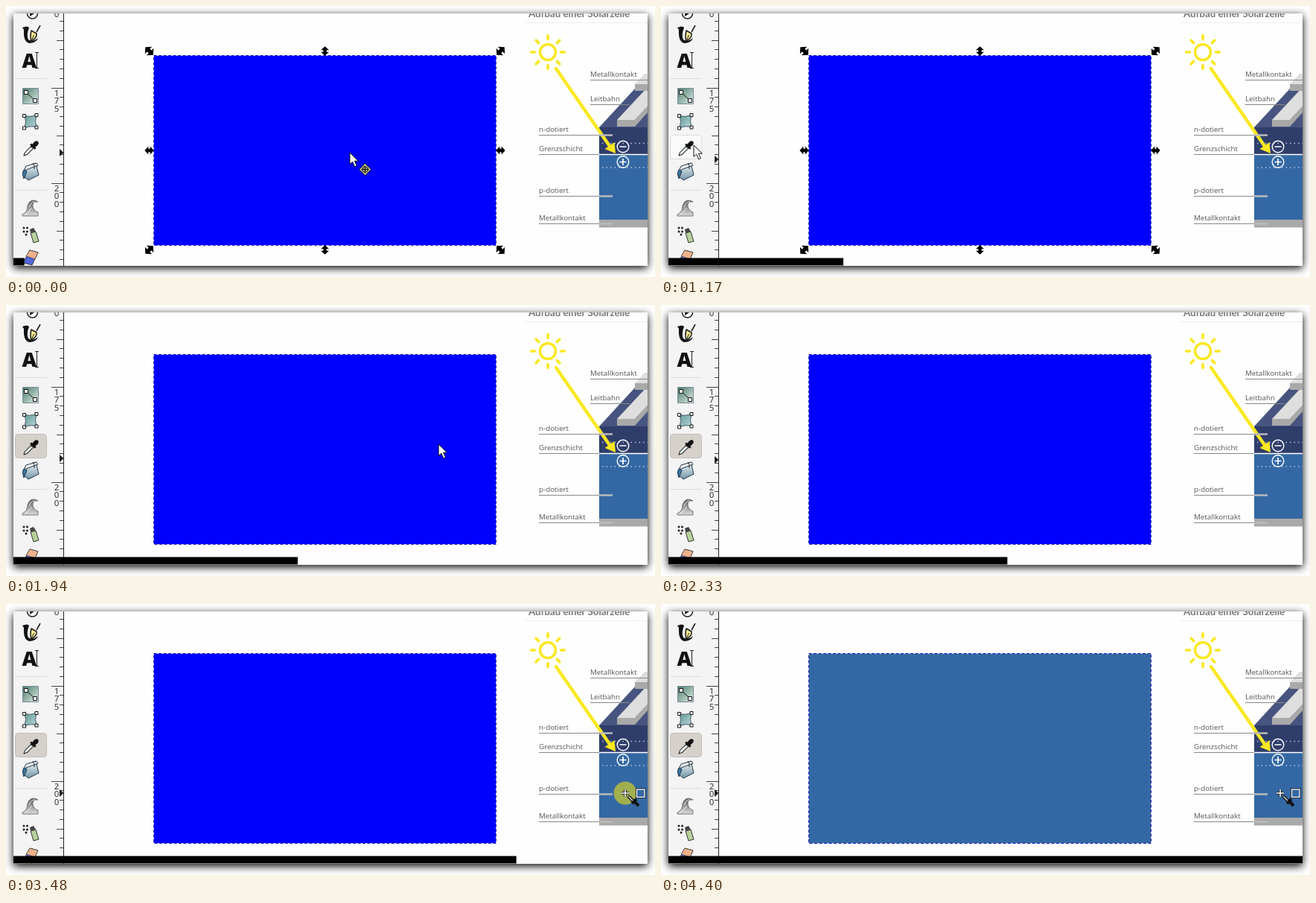
These frames come from a looping animation (872x364 px, 4490 ms). An HTML page:

```html
<!DOCTYPE html>
<html lang="de">
<head>
<meta charset="utf-8">
<style>
  html, body { margin: 0; width: 100%; height: 100%; overflow: hidden; background: #fff; }
  svg { display: block; }
  .shadow { filter: drop-shadow(0 3px 6px #000); }
  .label { font: 9.8px "Open Sans", "Noto Sans", sans-serif; fill: #555; }
  .title { font: bold 13.3px Lato, sans-serif; fill: #777; }
  .ruler { font: 11.5px "Noto Sans", sans-serif; fill: #333; text-anchor: middle; }
</style>
</head>
<body>
<svg width="872" height="364" viewBox="0 0 872 364">
  <defs>
    <clipPath id="view"><rect x="10" y="10" width="852" height="339"/></clipPath>
    <linearGradient id="green" x2="1" y2="1"><stop stop-color="#477b69"/><stop offset="1" stop-color="#e4efe9"/></linearGradient>
    <linearGradient id="mesh" x2="1" y2="1"><stop stop-color="#5f9a8e"/><stop offset="1" stop-color="#b9d6e0"/></linearGradient>
    <linearGradient id="water" x2="0" y2="1"><stop stop-color="#f4f7f8"/><stop offset="1" stop-color="#6f95a8"/></linearGradient>
    <linearGradient id="wave" x2="0" y2="1"><stop stop-color="#555"/><stop offset="1" stop-color="#ddd"/></linearGradient>
    <path id="handle" d="M-6.2 0l5-5.5v3.3h2.4v-3.3l5 5.5-5 5.5v-3.3h-2.4v3.3z"/>
  </defs>
  <rect class="shadow" x="10" y="10" width="852" height="339" fill="#fff"/>
  <g clip-path="url(#view)">
    <rect x="10" y="10" width="852" height="339" fill="#fefefe"/>

    <g id="diagram">
      <path d="M697 22.500H862" stroke="#eee"/>
      <text class="title" x="702" y="15">Aufbau einer Solarzelle</text>
      <path d="M797 163L845 111H862V163z" fill="#47547f"/>
      <path d="M797 163H862V199H797z" fill="#2f3d6a"/>
      <path d="M797 200H862V287H797z" fill="#3468a4"/>
      <path d="M797 287H862V297.500H797z" fill="#a9a9a9"/>
      <path d="M797 199.500H862" stroke="#fff" stroke-width="1.500"/>
      <path d="M801 184.500H862M801 217H862" stroke="#b9c6dc" stroke-width="1.500" stroke-dasharray="1.500 4"/>
      <path d="M821 153L862 109V135L845 153z" fill="#dedede"/>
      <path d="M821 153H845L862 135V143L845 162H821z" fill="#a9a9a9"/>
      <path d="M845 105L858 91H862V105z" fill="#dedede"/>
      <path d="M845 105H862V114H845z" fill="#a9a9a9"/>
      <g stroke="#fae822" fill="none">
        <circle cx="728" cy="62" r="10.500" stroke-width="3.500"/>
        <g id="rays" stroke-width="3.600" stroke-linecap="round"/>
        <path d="M739 84L813 191" stroke-width="4.500" stroke-linecap="round"/>
        <path d="M819 198L804.500 192 817.500 183z" fill="#fae822" stroke="none"/>
      </g>
      <g fill="none" stroke="#fff" stroke-width="1.400">
        <circle cx="829" cy="189" r="7.800"/><circle cx="829" cy="209.500" r="7.800"/>
        <path d="M824.500 189h9M824.500 209.500h9M829 205v9" stroke-width="1.700"/>
      </g>
      <g id="labels"></g>
    </g>

    <rect id="sheet" x="198.500" y="66.500" width="460" height="255" stroke="#d4d4f4"/>
    <rect x="198.500" y="66.500" width="460" height="255" fill="none" stroke="#1d1db8" stroke-dasharray="4 2.500"/>
    <g id="handles"></g>

    <rect x="10" y="10" width="67" height="339" fill="#f4f4f4"/>
    <path d="M12 97.500H55M12 247.500H55" stroke="#dcdcdc"/>
    <path d="M77.500 10V349" stroke="#222"/>
    <g id="ruler"></g>
    <path id="marker" d="M72-5l5.500 5-5.500 5z" fill="#222"/>
    <rect id="button" x="12.500" y="173.500" width="42" height="32" rx="4"/>

    <g id="icons" stroke-linejoin="round">
      <circle cx="35.500" cy="10" r="7" fill="#fff" stroke="#222" stroke-width="1.500"/>
      <path d="M32 5v9l6-4z" fill="#111"/>

      <path d="M22 29q7-3 9 0q-4 10-1 16q6 4 13-2q-2 6-11 7q-9-1-8-18z" fill="#111"/>
      <path d="M46 26l-5 9M34 33l7 4q1 6-7 10q-2-6 0-14z" fill="#f3e58d" stroke="#222" stroke-width="1.600"/>
      <path d="M34.500 46l3-7" stroke="#222"/>

      <text x="21.500" y="83" font-size="27" font-weight="800" font-family="Open Sans, sans-serif" fill="#111">A</text>
      <path d="M39 62.500h5M39 83.500h5M41.500 62.500v21" stroke="#222"/>

      <rect x="22.500" y="110.500" width="21" height="21" fill="url(#green)" stroke="#789"/>
      <path d="M27 116L39 127" stroke="#111"/>
      <path d="M24.500 113.500h5v5h-5zM36.500 124.500h5v5h-5z" fill="#fff" stroke="#111"/>

      <path d="M25 147Q32 150 41 146Q38 155 41 163Q33 160 25 164Q28 155 25 147z" fill="url(#mesh)" stroke="#456"/>
      <path d="M22.500 145.500h4v4h-4zM39 144.500h4v4h-4zM39 161h4v4h-4zM22.500 162h4v4h-4z" fill="#fff" stroke="#111"/>

      <g transform="translate(24 201) rotate(-45)">
        <path d="M0 0l4-2h12v4H4z" fill="#e4ecec" stroke="#222"/>
        <path d="M16-4.500h3v2q7-2 8 2.500q-1 4.500-8 2.500v2h-3z" fill="#111"/>
      </g>

      <path d="M26 217l14-6 4 16-14 7-6-5z" fill="url(#water)" stroke="#234"/>
      <path d="M24 221l19-7-2-3-14 4z" fill="#f5f8f9" stroke="#234"/>
      <path d="M24 220q-3 4 0 12l4-10z" fill="#3978a5" stroke="#234"/>
      <path d="M36 211q3 3 2 8" fill="none" stroke="#222"/>

      <path d="M22 280q7-3 7-12q4-11 14-5q-8-1-7 6q1 6 7 8v5H22z" fill="url(#wave)" stroke="#777"/>
      <path d="M31 270q3-8 8-7M25 280q8-4 9-9" fill="none" stroke="#eee"/>

      <path d="M24 298h9M24 303h9M27 307h2" stroke="#222" stroke-width="3" stroke-linecap="round" stroke-dasharray="0 4.500"/>
      <path d="M33 305l7-2 4 13-7 2z" fill="#b7d19b" stroke="#333"/>
      <path d="M32 300l5-2 3 5-7 2z" fill="#444"/>

      <path d="M32 328l11 3-8 17-12-3z" fill="#5468dc" stroke="#333"/>
      <path d="M32 328l11 3-4 9-12-4z" fill="#eeb28b" stroke="#555"/>
    </g>

    <circle id="click" r="15.500" fill="#bdc03a" opacity=".8"/>
    <g id="arrow">
      <path d="M0 0V15.500l3.600-3.300 3 6.600 2.700-1.200-3-6.400h5z" fill="#fff" stroke="#111"/>
      <g id="mover" transform="translate(20.500 22.500)" stroke="#111">
        <path d="M0-8L8 0 0 8-8 0z" fill="#c9c99d"/>
        <path d="M-5 0H5M0-5V5" stroke-width="1.300"/>
        <circle r="3.800" fill="none"/>
      </g>
    </g>
    <g id="picker">
      <path d="M-5 0H5M0-5V5" stroke="#222" stroke-width="3.500"/>
      <path d="M-5 0H5M0-5V5" stroke="#fff" stroke-width="1.500"/>
      <path d="M4 4L12 12" stroke="#111" stroke-width="4"/>
      <path d="M4.500 4.500L11 11" stroke="#ddd" stroke-width="1.500"/>
      <path d="M9 14l6-6M13 12l5 5" stroke="#111" stroke-width="4"/>
      <rect x="15.500" y="-5" width="10.500" height="10.500" fill="none" stroke="#111" stroke-width="3"/>
      <rect id="swatch" x="15.500" y="-5" width="10.500" height="10.500" stroke="#fff" stroke-width="1.300"/>
    </g>
    <rect id="progress" x="10" y="338.500" height="10"/>
  </g>
</svg>
<script>
const $ = id => document.getElementById(id);
const set = (id, attrs) => { for (const k in attrs) $(id).setAttribute(k, attrs[k]); };
const show = (id, on) => set(id, { visibility: on ? 'visible' : 'hidden' });
const repeat = (n, make) => Array.from({ length: n }, (_, i) => make(i)).join('');

$('rays').innerHTML = repeat(8, i => `<path d="M745.500 62h5" transform="rotate(${i * 45} 728 62)"/>`);

function label(text, x, y, end, tail) {
  const line = y + 5;
  return `<text class="label" x="${x}" y="${y}">${text}</text><path d="M${x} ${line}H${end}" stroke="#888"/>` +
    (tail ? `<path d="M${end} ${line}h18" stroke="#bbb" stroke-width="2.5"/>` : '');
}
$('labels').innerHTML =
  label('Metallkontakt', 785, 94.5, 862) + label('Leitbahn', 785, 127.5, 838) +
  label('n-dotiert', 716, 168.5, 797, true) + label('Grenzschicht', 716, 194.5, 797) +
  label('p-dotiert', 716, 250.5, 797, true) + label('Metallkontakt', 716, 287.5, 797, true);

// Eight resize handles on a 3 x 3 grid without its centre
$('handles').innerHTML = repeat(9, i => {
  const col = i % 3 - 1, row = Math.floor(i / 3) - 1;
  if (!col && !row) return '';
  const angle = Math.atan2(row, col) * 180 / Math.PI;
  const scale = col && row ? 1.2 : 1;
  return `<use href="#handle" transform="translate(${428.5 + col * 236} ${194 + row * 133.5}) rotate(${angle}) scale(${scale})"/>`;
});

const digits = (text, y) => repeat(text.length, i => `<text class="ruler" x="68" y="${y + i * 10.3}">${text[i]}</text>`);
$('ruler').innerHTML = repeat(27, i => {
  const left = (i + 3) % 10 ? ((i + 3) % 5 ? 72 : 68) : 61;
  return `<path d="M${left} ${Math.floor(20.4 + i * 12.8) + .5}H77" stroke="#444"/>`;
}) + digits('0', 15) + digits('175', 121) + digits('200', 249);

const LOOP = 4490, STEPS = 58, STEP = LOOP / STEPS, LEAD = 13;
const PICK_TOOL = 1320, PICKER = 2230, PICK_COLOR = 3550;
const CELL = '#3468a4';

// Pointer moves, each eased from where the last one ended
const home = { x: 462, y: 197 };
const moves = [
  { from: 450, to: 850, x: 120, y: 206 },
  { from: 850, to: 1000, x: 44, y: 187 },
  { from: 1640, to: 2130, x: 868, y: 187 },
  { from: 2130, to: 2300, x: 868, y: 208 },
  { from: 2400, to: 2800, x: 832, y: 254 }
];
function ease(t, from, to) {
  const u = Math.min(1, Math.max(0, (t - from) / (to - from)));
  return u * u * (3 - 2 * u);
}
const pointer = t => moves.reduce((p, m) => {
  const s = ease(t, m.from, m.to);
  return { x: p.x + (m.x - p.x) * s, y: p.y + (m.y - p.y) * s };
}, home);

function draw(now) {
  const step = Math.min(STEPS - 1, Math.floor((now % LOOP + LEAD) / STEP));
  const t = step * STEP;
  const { x, y } = pointer(t);
  const transform = `translate(${x.toFixed(2)} ${y.toFixed(2)})`;
  const selecting = t < PICK_TOOL, picking = t >= PICKER;
  const clicking = [PICK_TOOL, PICK_COLOR].some(end => t < end && t >= end - 2 * STEP);
  const tracked = picking || t < moves[0].to;

  for (const id of ['arrow', 'picker', 'click']) set(id, { transform });
  set('sheet', { fill: t >= PICK_COLOR ? CELL : '#00f' });
  set('swatch', { fill: t >= 2700 ? CELL : 'none' });
  set('button', selecting ? { fill: '#fafafa', stroke: '#ddd' } : { fill: '#d6d0cb', stroke: '#c4bdb7' });
  set('marker', { transform: `translate(0 ${tracked ? y : moves[0].y})` });
  set('progress', { width: 852 * (step + 1) / STEPS });
  show('handles', selecting);
  show('button', x < 55 || !selecting);
  show('arrow', !picking);
  show('mover', selecting && x > 198);
  show('picker', picking);
  show('click', clicking);
}

const begin = performance.now();
function tick() {
  draw(performance.now() - begin);
  requestAnimationFrame(tick);
}
tick();
</script>
</body>
</html>
```
